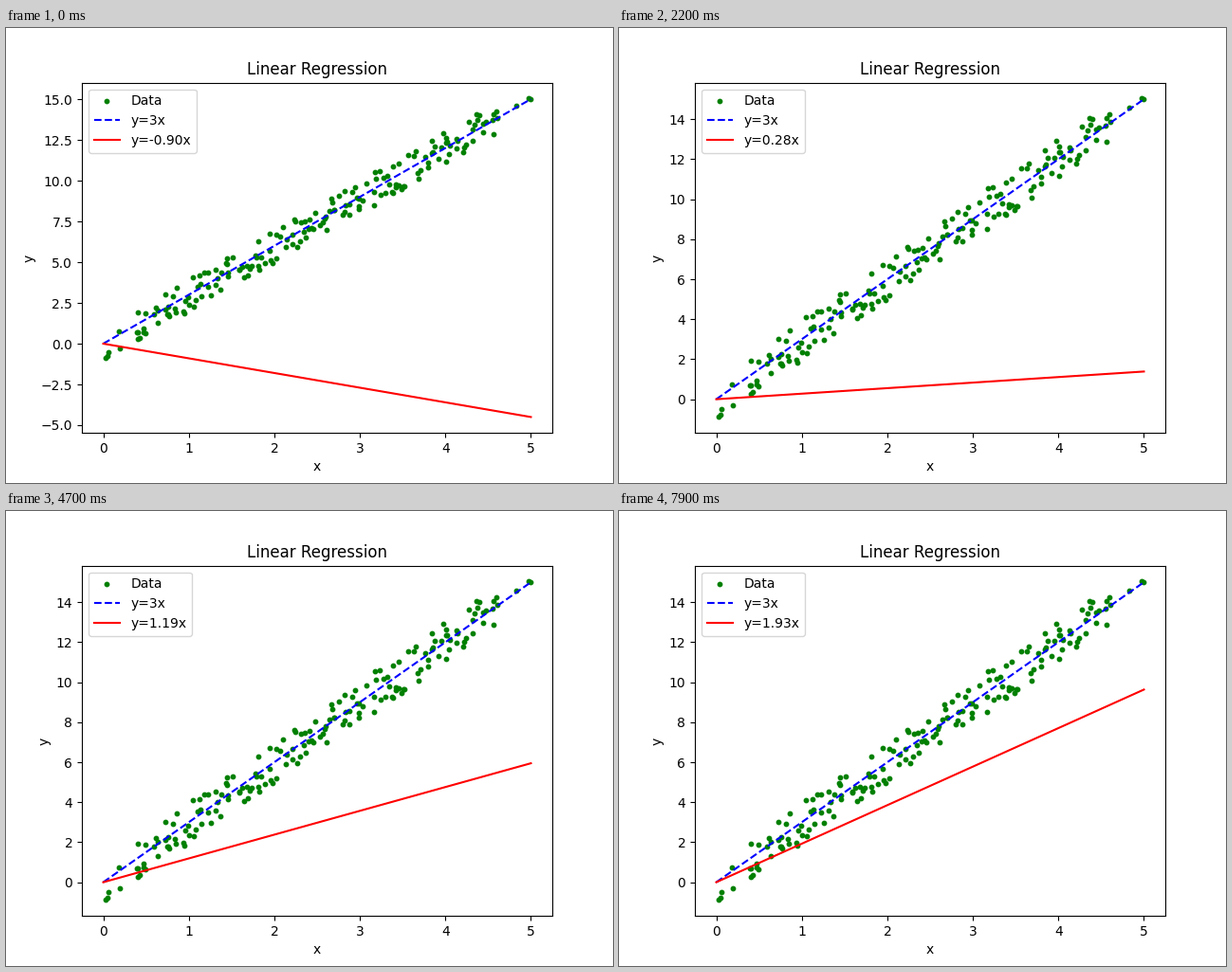
Animation, 640 px wide and 480 px high, one loop 8 s. Source, as a matplotlib script:

```python
import numpy as np
import matplotlib.pyplot as plt
from matplotlib.animation import FuncAnimation

SLOPE = 3.0
START = -0.9
RATE = 0.01633
FRAMES = 80
POINTS = 178

# Sparse points at both ends of the cloud; these set the axis limits.
ENDS = [(0.03, -0.89), (0.05, -0.77), (0.06, -0.5), (0.18, 0.74),
        (0.19, -0.31), (4.83, 14.6), (4.975, 15.035), (5.0, 15.0)]

rng = np.random.default_rng(5)
cloud_x = rng.uniform(-0.06, 0.06, POINTS) + np.linspace(0.36, 4.6, POINTS)
cloud_y = SLOPE * cloud_x + rng.uniform(-1, 1, POINTS)
data_x, data_y = np.vstack([ENDS, np.column_stack([cloud_x, cloud_y])]).T
line_x = np.linspace(0, 5, 100)

fig, ax = plt.subplots(figsize=(6.4, 4.8), dpi=100)


def weight(step):
    """Slope after some steps of gradient descent."""
    return SLOPE + (START - SLOPE) * np.exp(-RATE * step)


def draw(step):
    w = weight(step)
    ax.cla()
    ax.scatter(data_x, data_y, s=10, color="g", label="Data")
    ax.plot(line_x, SLOPE * line_x, "b--", label="y=3x")
    ax.plot(line_x, w * line_x, "r-", label=f"y={w:.2f}x")
    ax.set(title="Linear Regression", xlabel="x", ylabel="y")
    ax.legend(loc="upper left")


anim = FuncAnimation(fig, draw, frames=FRAMES, init_func=lambda: draw(0),
                     interval=100, repeat=True, repeat_delay=0)
plt.show()
```
